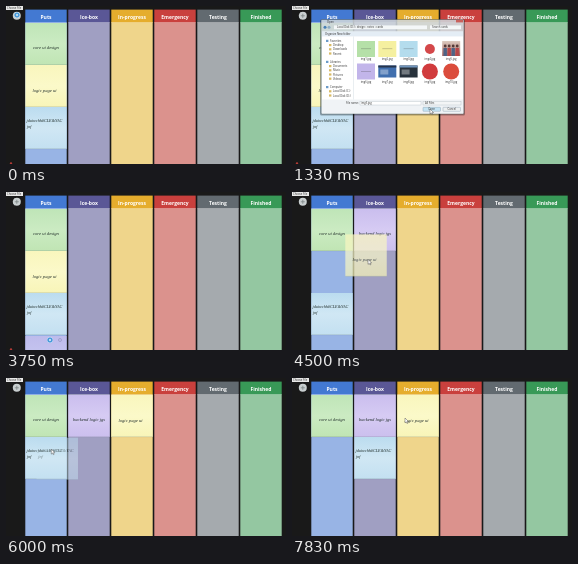
These frames come from a looping animation (280 px wide and 158 px high, 7.91 s). An HTML page:

```html
<!DOCTYPE html>
<html lang="en">
<head>
<meta charset="utf-8">
<title>Task board</title>
<style>
html, body { margin: 0; width: 100%; height: 100%; overflow: hidden; background: #191919; }
svg { display: block; width: 100vw; height: 100vh; }
.head { font: 700 5px "Open Sans", sans-serif; fill: #fff; text-anchor: middle; }
.note { font: italic 4.6px "Liberation Serif", serif; fill: #1d2a26; }
.code { font-size: 4.2px; }
.ui { font: 2.7px "Open Sans", sans-serif; fill: #333; }
.mid { text-anchor: middle; }
</style>
</head>
<body>
<svg id="stage" viewBox="0 0 280 158" preserveAspectRatio="none"></svg>
<script>
const LOOP = 7910, STEPS = 95;
const stage = document.getElementById("stage");

function el(parent, tag, attrs, text) {
  const node = document.createElementNS("http://www.w3.org/2000/svg", tag);
  for (const key in attrs) node.setAttribute(key, attrs[key]);
  if (text) node.textContent = text;
  parent.appendChild(node);
  return node;
}
const group = parent => el(parent, "g", {});
const rect = (p, x, y, width, height, fill, more) =>
  el(p, "rect", { x, y, width, height, fill, ...more });
const label = (p, x, y, text, cls = "ui") => el(p, "text", { x, y, class: cls }, text);
const place = (node, x, y) => node.setAttribute("transform", `translate(${x} ${y})`);
const show = (node, on) => node.setAttribute("visibility", on ? "visible" : "hidden");

const defs = el(stage, "defs", {});
function gradient(id, ...colors) {
  const g = el(defs, "linearGradient", { id, x2: 0, y2: 1 });
  colors.forEach((c, i) => el(g, "stop", { offset: i / (colors.length - 1), "stop-color": c }));
  return `url(#${id})`;
}

// Board
rect(stage, 0, 0, 280, 158, "#191919");
[
  ["Puts", "#4379d2", "#98b4e5"],
  ["Ice-box", "#5a5796", "#a09fc2"],
  ["In-progress", "#e5ad2d", "#efd58b"],
  ["Emergency", "#c9403d", "#db928d"],
  ["Testing", "#626a70", "#a5aaae"],
  ["Finished", "#389957", "#94c7a1"]
].forEach(([name, head, body], i) => {
  const x = 19.3 + i * 43;
  rect(stage, x, 3.6, 41.4, 13.4, head);
  rect(stage, x, 16.5, 41.4, 141.5, body);
  rect(stage, x, 16, 41.4, 0.6, "#fff", { opacity: 0.4 });
  label(stage, x + 20.7, 12.7, name, "head");
});
rect(stage, 0, 0, 17, 4, "#e8e8e8");
label(stage, 1, 3, "Choose File");
el(stage, "circle", { cx: 10.8, cy: 9.8, r: 4, fill: "#c9cfd0" });
el(stage, "path", { d: "M10.8 7.8v4M8.8 9.8h4", stroke: "#7c8385", "stroke-width": 0.8 });
const dot = el(stage, "circle", { cx: 5, cy: 157.5, r: 1.2, fill: "#b53a36" });

// Notes
function makeCard(fill, lines) {
  const g = group(stage);
  rect(g, 0.3, 0, 41.4, 42, fill);
  rect(g, 0.3, 41.5, 41.4, 0.6, "#4b5b62", { opacity: 0.3 });
  lines.forEach(([x, y, text, cls = ""]) => label(g, x, y, text, "note " + cls));
  return g;
}
const blueFill = gradient("blue", "#bbdcef", "#d0e7f4", "#c3e0f1");
const blueLines = [[1.5, 14.5, "jduiwchh#CLE&YAC", "code"], [2, 20.6, "jnf", "code"]];
const green = makeCard(gradient("green", "#bfe5b8", "#cbebc2", "#c0e5b4"),
  [[8, 26, "core ui design"]]);
const purple = makeCard(gradient("purple", "#cabeee", "#d6cbf3", "#cbbfee"),
  [[5, 26, "backend logic jgs"]]);
const yellow = makeCard(gradient("yellow", "#f9f6bd", "#fbf9c9", "#f8f5b8"),
  [[7.5, 26.5, "logic page ui"]]);
const blue = makeCard(blueFill, blueLines);
const ghost = makeCard(blueFill, blueLines);
ghost.setAttribute("opacity", 0.5);
place(green, 19, 17);

// File dialog
const dialog = group(stage);
rect(dialog, 28, 13.5, 145, 96, "#000", { opacity: 0.3, rx: 1.5 });
rect(dialog, 29, 13.5, 143, 94.5, "#dde5ea",
  { rx: 1, opacity: 0.82, stroke: "#46545a", "stroke-width": 0.5 });
label(dialog, 35, 17.3, "Open");
rect(dialog, 164, 13.8, 7, 2.6, "#c9605b");
el(dialog, "circle", { cx: 33, cy: 21.3, r: 1.5, fill: "#477eb5" });
el(dialog, "circle", { cx: 37, cy: 21.3, r: 1.5, fill: "#8eacc3" });
rect(dialog, 42, 19.4, 93, 3.8, "#f4f7f8");
label(dialog, 45, 22.3, "Local Disk (D:)  ›  design  ›  notes  ›  cards");
rect(dialog, 138, 19.4, 31, 3.8, "#f4f7f8");
label(dialog, 140, 22.3, "Search cards");
rect(dialog, 30, 25.5, 141, 82, "#f0f3f6");
rect(dialog, 30, 25.5, 141, 5, "#e4edf5");
label(dialog, 33, 29.2, "Organize      New folder");
rect(dialog, 30, 30.5, 141, 63, "#fff");
rect(dialog, 61, 30.5, 0.5, 63, "#d3dce2");
["Favorites", "Desktop", "Downloads", "Recent", "", "Libraries", "Documents", "Music",
 "Pictures", "Videos", "", "Computer", "Local Disk (C:)", "Local Disk (D:)"].forEach((text, i) => {
  if (!text) return;
  const y = 36 + i * 4.2, top = ["Favorites", "Libraries", "Computer"].includes(text);
  rect(dialog, top ? 34 : 37, y - 2.2, 2.4, 2.2, top ? "#6b9bc8" : "#d8ba65");
  label(dialog, top ? 38 : 41, y, text);
});

const notePic = fill => (x, y) => {
  rect(dialog, x, y, 18, 16, fill);
  rect(dialog, x + 4, y + 7.5, 10, 0.6, "#333", { opacity: 0.4 });
};
const screenPic = (fill, bar) => (x, y) => {
  rect(dialog, x, y + 2, 18, 12, fill);
  rect(dialog, x, y + 2, 18, 2, bar);
  rect(dialog, x + 2, y + 6, 8, 5, "#fff", { opacity: 0.35 });
};
const discPic = (fill, r) => (x, y) => el(dialog, "circle", { cx: x + 9, cy: y + 8, r, fill });
function groupPhoto(x, y) {
  rect(dialog, x, y, 18, 15, gradient("photo", "#dccbc0", "#a4615c"));
  for (let n = 0; n < 4; n++) {
    const px = x + 3 + n * 4;
    el(dialog, "circle", { cx: px, cy: y + 5, r: 1.4, fill: "#563b38" });
    rect(dialog, px - 1.7, y + 7, 3.4, 8, n % 2 ? "#b64649" : "#4e6386");
  }
}
[
  notePic("#b5e0a8"), notePic("#f5f0a0"), notePic("#b4dced"), discPic("#d4484a", 5), groupPhoto,
  notePic("#c2b5ea"), screenPic("#416fae", "#26344c"), screenPic("#28323c", "#7195bd"),
  discPic("#d13b3d", 8), discPic("#db4c3c", 8)
].forEach((draw, i) => {
  const x = 65 + i % 5 * 21.3, y = i < 5 ? 35 : 57.5;
  draw(x, y);
  label(dialog, x + 9, y + 19, `img${i + 1}.jpg`, "ui mid");
});
label(dialog, 54, 98.2, "File name:");
rect(dialog, 68, 95.4, 61, 3.6, "#fff", { stroke: "#9aa9b2", "stroke-width": 0.3 });
label(dialog, 69, 98.2, "img3.jpg");
rect(dialog, 131, 95.4, 38, 3.6, "#f3f5f6", { stroke: "#9aa9b2", "stroke-width": 0.3 });
label(dialog, 133, 98.2, "All Files");
[[131, "Open", "#c4e3f3"], [151, "Cancel", "#edf0f1"]].forEach(([x, text, fill]) => {
  rect(dialog, x, 101.3, 17.5, 4, fill, { rx: 0.6, stroke: "#718c9d", "stroke-width": 0.35 });
  label(dialog, x + 8.7, 104.3, text, "ui mid");
});

// Pointers
const arrow = el(stage, "path", {
  d: "M0 0V5L1.2 3.9 2 5.6 2.8 5.2 2 3.6H3.6Z", fill: "#fff", stroke: "#333", "stroke-width": 0.4
});
const busy = group(stage);
el(busy, "circle", { r: 3, fill: "#c3e4f6", opacity: 0.8 });
el(busy, "circle", { r: 1.9, fill: "none", stroke: "#3f94d8", "stroke-width": 1.4 });
const mark = el(stage, "circle", { cx: 54, cy: 148, r: 1.5, fill: "none", stroke: "#8b8fb8", "stroke-width": 0.6 });

// Each row: time, x, y
const pointerPath = [
  [0, 11, 9], [330, 11, 9], [830, 116, 64], [1250, 138, 103], [1580, 138, 103],
  [2330, 53, 131], [2500, 53, 131], [2750, 11, 9], [2910, 94, 64], [3170, 138, 103],
  [3330, 138, 103], [3660, 44, 148], [3830, 44, 148], [4080, 83, 40], [4330, 42, 84],
  [4750, 128, 42], [5000, 42, 84], [5750, 34, 70], [5920, 42, 71], [6670, 75, 72],
  [7080, 75, 72], [7500, 113, 40], [7910, 113, 40]
];
const purplePath = [[3830, 19, 144], [4080, 62, 17]];
const yellowPath = [[4330, 19, 59], [4750, 105, 17]];
const ghostPath = [[5750, 19, 59], [5920, 27, 59.5], [6670, 59.5, 61.5]];

function along(path, t) {
  if (t <= path[0][0]) return path[0].slice(1);
  for (let i = 1; i < path.length; i++) {
    const [a, ax, ay] = path[i - 1], [b, bx, by] = path[i];
    if (t <= b) {
      const u = (t - a) / (b - a);
      return [ax + (bx - ax) * u, ay + (by - ay) * u];
    }
  }
  return path[path.length - 1].slice(1);
}
const within = (t, a, b) => t >= a && t < b;

function draw(now) {
  const step = Math.floor((now % LOOP + 5) * STEPS / LOOP) % STEPS;
  const t = step * LOOP / STEPS;
  const pos = along(pointerPath, t);
  const waiting = t < 330 || within(t, 2740, 2830) || within(t, 3580, 3820);
  place(arrow, ...pos);
  place(busy, ...pos);
  show(arrow, !waiting);
  show(busy, waiting);
  show(mark, within(t, 3580, 3820));
  show(dialog, within(t, 330, 1580) || within(t, 2830, 3320));
  show(dot, t < 4000);

  place(purple, ...along(purplePath, t));
  show(purple, t >= 3320);
  purple.setAttribute("opacity", within(t, 3320, 4070) ? 0.75 : 1);
  place(yellow, ...along(yellowPath, t));
  yellow.setAttribute("opacity", within(t, 4330, 4740) ? 0.7 : 1);
  place(blue, t < 7070 ? 19 : 62, t < 4740 ? 101 : 59);
  place(ghost, ...along(ghostPath, t));
  show(ghost, within(t, 5820, 7070));
}

const start = performance.now();
function tick() {
  draw(performance.now() - start);
  requestAnimationFrame(tick);
}
draw(0);
requestAnimationFrame(tick);
</script>
</body>
</html>
```
